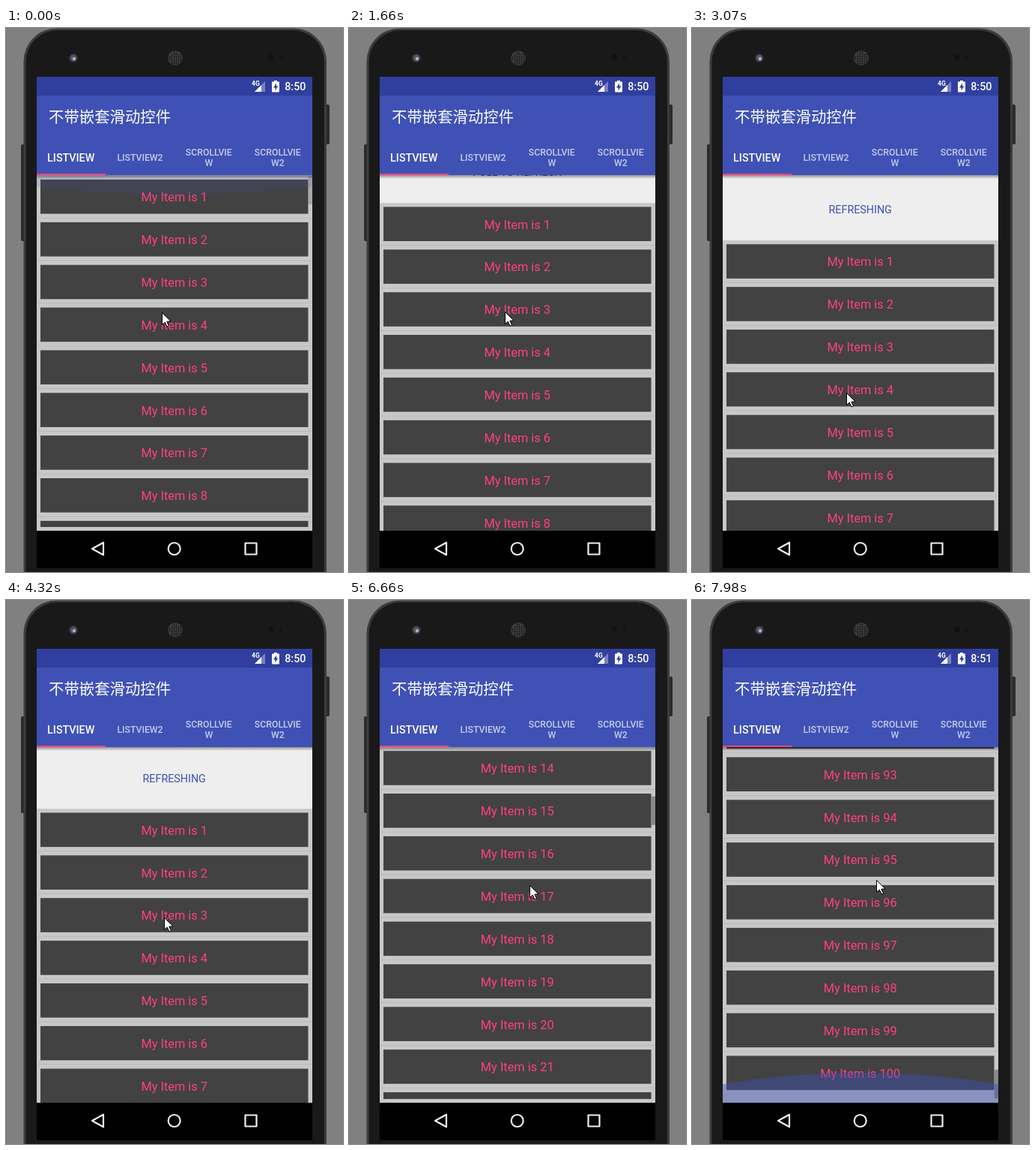
Write an HTML page with a canvas that moves like this. It is 450 by 725 pixels and loops after 8 s.

```html
<!DOCTYPE html>
<html lang="zh-CN">
<head>
<meta charset="utf-8">
<style>
html, body { margin: 0; width: 100%; height: 100%; overflow: hidden; background: #808080; }
canvas { display: block; }
</style>
</head>
<body>
<canvas id="stage" width="450" height="725"></canvas>
<script>
const ctx = document.getElementById('stage').getContext('2d');
const LOOP = 8000, PITCH = 56.86, HEADER = 81.5, MAX_SCROLL = 5280.5;
const INDIGO = '#3f51b5', PINK = '#ff4081', GREY = '#c8c8c8';

const bursts = [[150, 1120, 8], [1240, 2180, 8], [2330, 2630, 3], [2910, 3890, 8], [4010, 4010, 1],
  [4320, 5240, 8], [5390, 5960, 5], [6240, 7190, 8], [7310, 7980, 6]];
const ticks = [0];
for (const [a, b, n] of bursts)
  for (let i = 0; i < n; i++) ticks.push(n > 1 ? a + (b - a) * i / (n - 1) : a);

// Key rows are [time, ...values]
const pointer = [[0, 208, 379], [400, 208, 431], [600, 208, 425], [1120, 209, 299], [1240, 209, 299],
  [2180, 207, 484], [2630, 207, 498], [2910, 207, 498], [3890, 202, 413], [4010, 211, 423],
  [4320, 211, 423], [5240, 233, 515], [5960, 236, 523], [6240, 237, 515], [6500, 240, 310],
  [6900, 244, 500], [7310, 246, 308], [7500, 246, 295], [7980, 246, 373]];
const pull = [[1240, 0], [2180, 85], [2630, 91], [2900, 91], [3200, HEADER], [5380, HEADER],
  [5530, 58], [5670, 30], [5820, 9], [5960, 0]];
const scroll = [[6200, 0], [6380, 120], [6520, 420], [6800, 1250], [7050, 1950], [7310, 2527],
  [7450, 3150], [7580, 3900], [7712, 4620], [7846, MAX_SCROLL]];
const topGlow = [[0, 0.14], [600, 0]];
const bottomGlow = [[7780, 0], [7980, 0.45]];
const barAlpha = [[0, 0.16], [450, 0], [6200, 0], [6300, 0.32]];

function at(keys, t) {
  const next = keys.findIndex(k => k[0] > t);
  if (next === 0) return keys[0].slice(1);
  if (next < 0) return keys[keys.length - 1].slice(1);
  const a = keys[next - 1], b = keys[next], p = (t - a[0]) / (b[0] - a[0]);
  return a.slice(1).map((v, i) => v + (b[i + 1] - v) * p);
}

function rect(x, y, w, h, fill) {
  ctx.fillStyle = fill;
  ctx.fillRect(x, y, w, h);
}

function round(x, y, w, h, r, fill) {
  ctx.fillStyle = fill;
  ctx.beginPath();
  ctx.roundRect(x, y, w, h, r);
  ctx.fill();
}

function disc(x, y, r, fill) {
  ctx.fillStyle = fill;
  ctx.beginPath();
  ctx.arc(x, y, r, 0, 7);
  ctx.fill();
}

function poly(points, fill, stroke, width) {
  ctx.beginPath();
  points.forEach(([x, y]) => ctx.lineTo(x, y));
  ctx.closePath();
  if (fill) { ctx.fillStyle = fill; ctx.fill(); }
  if (stroke) { ctx.strokeStyle = stroke; ctx.lineWidth = width; ctx.stroke(); }
}

function text(str, x, y, size, fill, weight = 400, align = 'center') {
  ctx.font = `${weight} ${size}px Roboto, "Noto Sans CJK SC", "Noto Sans CJK", sans-serif`;
  ctx.textAlign = align;
  ctx.fillStyle = fill;
  ctx.fillText(str, x, y);
}

function clip(x, y, w, h, draw) {
  ctx.save();
  ctx.beginPath();
  ctx.rect(x, y, w, h);
  ctx.clip();
  draw();
  ctx.restore();
}

function drawPhone() {
  rect(0, 0, 450, 725, '#808080');
  round(20, 155, 6, 129, 2, '#2b2b2b');
  round(426, 102, 6, 53, 2, '#2b2b2b');
  round(23.5, 0.5, 404.5, 800, [44, 44, 0, 0], '#3c3c3c');
  round(26.5, 3, 398.5, 800, [42, 42, 0, 0], '#191919');
  disc(90, 40, 6, '#333');
  disc(90, 40, 4.2, '#50566a');
  disc(91, 41, 2.2, '#aab2cc');
  disc(226, 40, 9.8, '#3d3d3d');
  for (let y = -8; y <= 8; y += 3)
    for (let x = -8; x <= 8; x += 3)
      if (x * x + y * y < 75) disc(226.5 + x, 40.5 + y, 0.9, '#161616');
  disc(354, 39, 3.5, '#111');
  disc(367, 39, 2.5, '#131313');
}

function drawBars(clock) {
  rect(41, 65, 368, 25, '#303f9f');
  rect(41, 90, 368, 106, INDIGO);
  text('4G', 328, 77, 8.5, '#fff', 700, 'left');
  poly([[346, 71], [346, 85], [332, 85]], 'rgba(255,255,255,.35)');
  poly([[341, 76], [341, 85], [332, 85]], '#fff');
  rect(358, 70, 4, 2, '#fff');
  round(355, 71.5, 10, 14, 1, '#fff');
  poly([[361, 73.5], [357, 79.5], [359.5, 79.5], [359.5, 83.5], [363.3, 77.5], [361, 77.5]], '#303f9f');
  text(clock, 386.3, 83, 14.3, '#fff', 500);

  text('不带嵌套滑动控件', 57, 126, 20.4, '#fff', 400, 'left');
  const dim = 'rgba(255,255,255,.7)';
  text('LISTVIEW', 86.7, 177.5, 14.3, '#fff', 500);
  text('LISTVIEW2', 179, 177, 12.27, dim, 500);
  text('SCROLLVIE', 270.8, 170, 12.27, dim, 500);
  text('W', 270.8, 184, 12.27, dim, 500);
  text('SCROLLVIE', 362.8, 170, 12.27, dim, 500);
  text('W2', 362.8, 184, 12.27, dim, 500);
  rect(41, 194, 92, 2, PINK);

  const shade = ctx.createLinearGradient(0, 196, 0, 201);
  shade.addColorStop(0, 'rgba(0,0,0,.4)');
  shade.addColorStop(1, 'rgba(0,0,0,0)');
  rect(41, 196, 368, 5, shade);
}

function drawNav() {
  rect(41, 670, 368, 50, '#000');
  ctx.lineJoin = 'round';
  poly([[115, 694], [130, 685.7], [130, 702.3]], null, '#eee', 2.2);
  poly([[319.5, 686.5], [334.5, 686.5], [334.5, 701.5], [319.5, 701.5]], null, '#eee', 2.2);
  ctx.beginPath();
  ctx.arc(224.7, 694, 8, 0, 7);
  ctx.stroke();
}

function drawList(offset, shift, refreshed) {
  const top = 196.8 + offset;
  rect(41, top, 368, 500, GREY);
  clip(41, top - 0.8, 368, 469, () => {
    const first = Math.floor(shift / PITCH), last = refreshed ? 100 : 99;
    for (let i = first; i <= Math.min(first + 9, last); i++) {
      const y = top + i * PITCH - shift;
      rect(46, y + 5.2, 357.5, 45.6, '#424242');
      rect(41, y + PITCH - 1, 368, 1, '#bababa');
      const label = refreshed ? (i ? 'My Item is ' + i : 'refresh') : 'My Item is ' + (i + 1);
      text(label, 224.7, y + 34.4, 16.35, PINK);
    }
  });
}

// Edge glow: flat band at the sides, bulging by `bulge` in the middle.
function drawGlow(edge, side, bulge, alpha) {
  if (!alpha) return;
  ctx.fillStyle = `rgba(63,81,181,${alpha})`;
  ctx.beginPath();
  ctx.moveTo(41, edge);
  ctx.lineTo(41, side);
  ctx.quadraticCurveTo(225, side + 2 * bulge, 409, side);
  ctx.lineTo(409, edge);
  ctx.fill();
}

function drawPointer(x, y) {
  const shape = [[0, 0], [0, 16], [3.7, 12.6], [6.6, 18.5], [9, 17.4], [6.3, 11.8], [11.5, 11.3]];
  ctx.lineJoin = 'miter';
  poly(shape.map(([dx, dy]) => [x + dx + 0.5, y + dy + 0.5]), '#fff', '#000', 1);
}

function draw(t) {
  const [offset] = at(pull, t), [shift] = at(scroll, t), [bar] = at(barAlpha, t);
  const refreshed = t >= 4900;
  const state = refreshed ? 'COMPLETE' : t >= 2900 ? 'REFRESHING'
    : offset >= HEADER ? 'RELEASE TO REFRESH' : 'PULL TO REFRESH';

  drawPhone();
  clip(41, 196, 368, 474, () => {
    rect(41, 196, 368, 474, '#eee');
    if (offset) text(state, 224.7, 161 + offset, 14.3, INDIGO);
    drawList(offset, shift, refreshed);
    const barY = 197 + shift / MAX_SCROLL * 429;
    rect(404, barY, 5, 38, `rgba(0,0,0,${bar})`);
    const [upper] = at(topGlow, t), [lower] = at(bottomGlow, t);
    drawGlow(196, 199 + upper * 93, upper * 70, upper);
    drawGlow(670, 670 - lower * 55, -lower * 34, lower);
  });
  drawBars(t >= 6700 ? '8:51' : '8:50');
  drawNav();
  drawPointer(...at(pointer, t).map(Math.round));
}

function frame() {
  const now = performance.now() % LOOP;
  draw(ticks.filter(k => k <= now).pop());
  requestAnimationFrame(frame);
}
frame();
</script>
</body>
</html>
```
